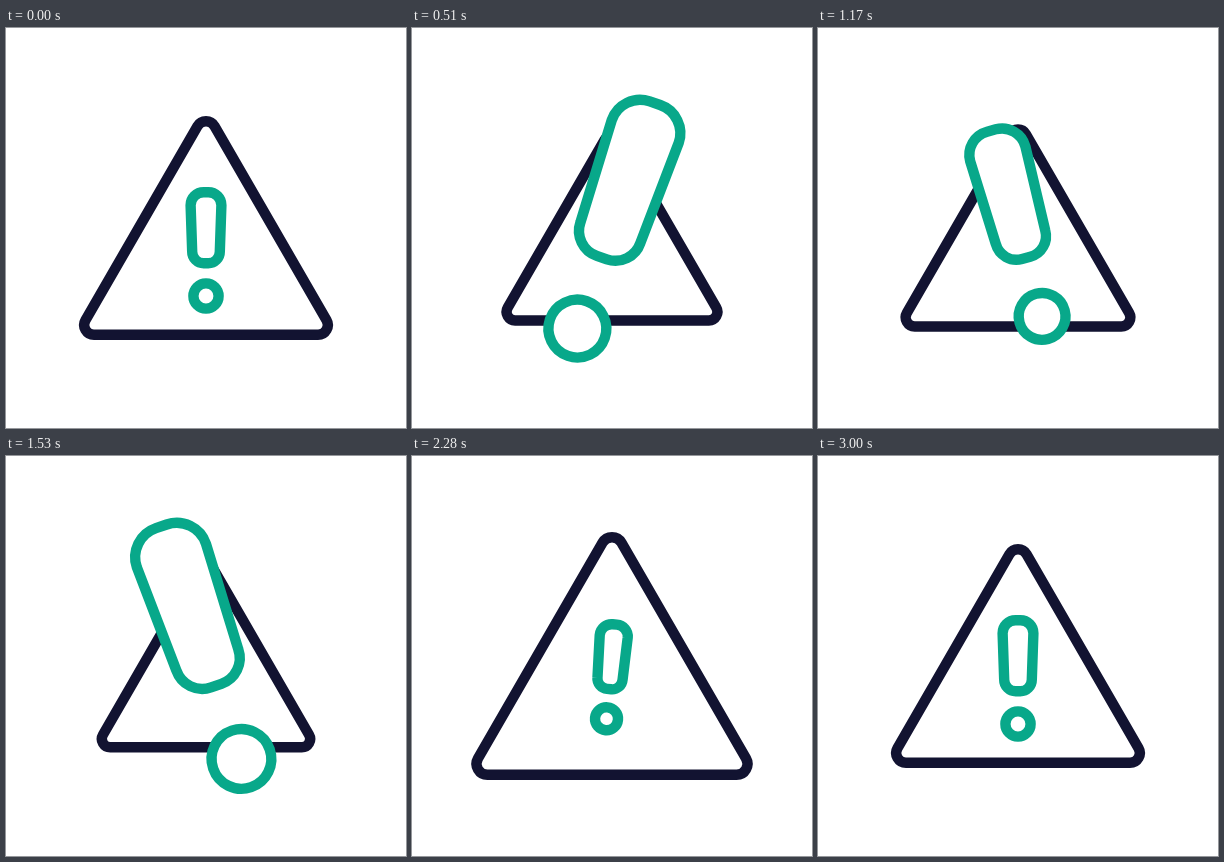
Recreate the animation shown at these times as an HTML page. Size 400 by 400 pixels, loop 4030 ms.

```html
<!DOCTYPE html>
<html lang="en">
<head>
<meta charset="utf-8">
<title>Warning sign</title>
<style>
  html, body { margin: 0; width: 100%; height: 100%; overflow: hidden; background: #fff; }
  svg { display: block; width: 100%; height: 100%; }
  path, circle { fill: #fff; stroke-width: 10.4; vector-effect: non-scaling-stroke; }
  #triangle { stroke: #121331; }
  #mark { stroke: #08a88a; }
</style>
</head>
<body>
<svg viewBox="-200 -200 400 400">
  <path id="triangle" d="M-8.5-101.9A9.8 9.8 0 0 1 8.5-101.9L120.5 92.1A9.8 9.8 0 0 1 112 106.8H-112A9.8 9.8 0 0 1-120.5 92.1Z"/>
  <g id="mark">
    <path d="M-2.4-58.5H2.4A13 13 0 0 1 15.4-45.5L13.8 1.1A11.5 11.5 0 0 1 2.3 12.6H-2.3A11.5 11.5 0 0 1-13.8 1.1L-15.4-45.5A13 13 0 0 1-2.4-58.5Z"/>
    <circle cy="45.3" r="12.6"/>
  </g>
</svg>
<script>
const LOOP = 4030;
const triangle = document.getElementById("triangle");
const mark = document.getElementById("mark");

function draw() {
  const time = performance.now() % LOOP;

  // Eased progress from 0 to 1 between two moments in ms
  const step = (start, end) => {
    const x = Math.min(1, Math.max(0, (time - start) / (end - start)));
    return x * x * (3 - 2 * x);
  };

  // The mark swells, eases off, swells again, dips and settles
  const swell = step(0, 430);
  const ebb = step(430, 940) - step(940, 1385);
  const shrink = step(1630, 2180);
  const settle = step(2180, 2640);
  const size = 1 + 1.37 * swell - 1.09 * ebb - 1.47 * shrink + 0.1 * settle;
  const offset = 22.7 - 21.2 * swell + 12.8 * ebb + 20.1 * shrink + 1.1 * settle;

  // It leans right, swings left, then rocks back upright
  const angle = 19 * swell - 38 * step(575, 1315) + 24 * step(1640, 2260) - 5 * step(2260, 3000);

  // The triangle answers in the opposite direction
  const triangleSize = 1 - 0.14 * swell + 0.083 * step(430, 950) - 0.103 * step(950, 1715)
    + 0.283 * step(1735, 2200) - 0.123 * step(2200, 2640);

  triangle.setAttribute("transform", `scale(${triangleSize})`);
  mark.setAttribute("transform", `rotate(${angle}) translate(0 ${offset}) scale(${size})`);
  requestAnimationFrame(draw);
}
draw();
</script>
</body>
</html>
```
